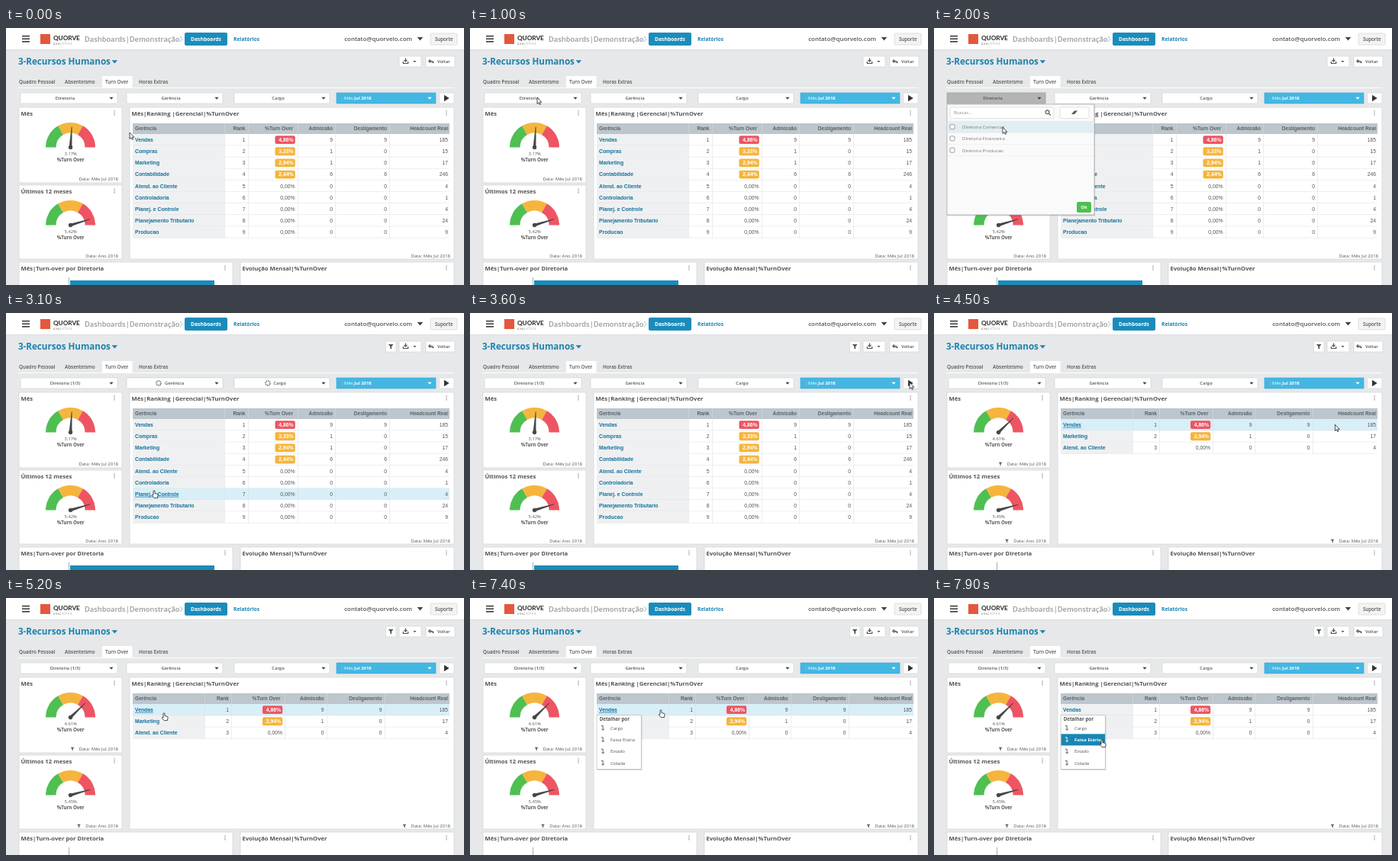
Write an HTML page that moves like this. It is 600 px wide and 337 px high and loops after 8 s.

```html
<!DOCTYPE html>
<html lang="pt-BR">
<head>
<meta charset="utf-8">
<title>Painel de Recursos Humanos</title>
<style>
  html, body { margin: 0; width: 100%; height: 100%; overflow: hidden; background: #e7e8e9; }
  svg { display: block; width: 100%; height: 100%; }
  text { font-family: "Open Sans", sans-serif; font-size: 6px; fill: #555; white-space: pre; }
  .b { font-weight: 700; }
  .s { font-weight: 600; }
  .end { text-anchor: end; }
  .mid { text-anchor: middle; }
  .title { font-size: 7.7px; font-weight: 700; fill: #555; }
  .cell { font-family: "Liberation Sans", Arial, sans-serif; font-size: 6.8px; }
  .head { font-family: "Liberation Sans", Arial, sans-serif; font-size: 6.6px; font-weight: 700; fill: #5a6268; }
  .name { font-weight: 700; fill: #14719c; }
  .white { fill: #fff; }
  .blue { fill: #1a83b0; }
  .hover { fill: #d8eff8; opacity: 0; }
  .on > .hover { opacity: 1; }
  .on > .name { text-decoration: underline; }
  .item.on > .hover { fill: #1b86b2; }
  .item.on > text { fill: #fff; font-weight: 700; }
  .item.on > path { stroke: #fff; }
  .option.on > .hover { fill: #e1eef3; }
</style>
</head>
<body>
<svg id="stage" viewBox="0 0 600 337" xmlns="http://www.w3.org/2000/svg"></svg>
<script>
const LOOP = 8000;
const OPEN = 1100, CHECK = 2250, APPLY = 2600, READY = 3500, RUN = 3700, DONE = 4400, DETAIL = 5900;

const text = (x, y, s, cls = '', style = '') => `<text x="${x}" y="${y}" class="${cls}" style="${style}">${s}</text>`;
const rect = (x, y, w, h, fill, more = '') => `<rect x="${x}" y="${y}" width="${w}" height="${h}" fill="${fill}" ${more}/>`;
const path = (d, fill, more = '') => `<path d="${d}" fill="${fill}" ${more}/>`;
const group = (id, body) => `<g id="${id}">${body}</g>`;
const caret = (x, y, w, fill) => path(`M${x - w} ${y - w / 2}h${2 * w}l${-w} ${w * 1.15}z`, fill);
const funnel = (x, y, k = 1) => path('M-3.3 -3H3.3L.9 0V3.6L-.9 2.4V0Z', '#555', `transform="translate(${x} ${y}) scale(${k})"`);
const box = (x, y, w, h, fill = '#fff') => rect(x, y, w, h, fill, 'rx="1.5" stroke="#d2d4d6" stroke-width=".7"');
const dots = (x, y) => [0, 2.4, 4.8].map(d => `<circle cx="${x}" cy="${y + d}" r=".7" fill="#777"/>`).join('');

const panels = [
  [17, 104, 135, 99, 'Mês'],
  [17, 206, 135, 97, 'Últimos 12 meses'],
  [162, 104, 425, 199, 'Mês|Ranking |Gerencial|%TurnOver'],
  [17, 307, 280, 40, 'Mês|Turn-over por DIretoria'],
  [307, 307, 280, 40, 'Evolução Mensal|%TurnOver']
];
const panel = ([x, y, w, h, s]) =>
  rect(x, y, w, h, '#fff', 'stroke="#d5d7d9" stroke-width=".8"') +
  text(x + 2.4, y + 10.7, s, 'title') + dots(x + w - 10, y + 5);

function header() {
  return rect(0, 0, 600, 28.5, '#fff') + rect(0, 28, 600, .8, '#d9dadb') +
    [10.6, 14.2, 17.8].map(y => rect(21, y - .8, 10, 1.7, '#444')).join('') +
    rect(45, 8, 13, 13, '#e4573d') +
    text(62, 16.4, 'QUORVE', '', 'font:700 8.2px Lato,sans-serif;fill:#222') +
    text(62, 21.6, 'ANALYTICS', '', 'font-size:3.3px;letter-spacing:.9px;fill:#777') +
    text(103, 17.6, 'Dashboards|Demonstração', 's', 'font-size:9.3px;fill:#999') +
    path('M228 11l3 3.5l-3 3.5', 'none', 'stroke="#8cc5dd" stroke-width="1"') +
    rect(234, 6, 56, 17, '#1b8cba', 'rx="2"') +
    text(262, 16.8, 'Dashboards', 'b white mid', 'font-size:6.75px') +
    text(298, 16.8, 'Relatórios', 'b blue', 'font-size:6.7px') +
    text(532, 17.3, 'contato@quorvelo.com', 's end', 'font-size:7.9px') +
    caret(542.5, 14, 3.8, '#444') + box(556, 7, 35, 15, '#f3f3f3') +
    text(573.7, 16.8, 'Suporte', 's mid', 'font-size:6.2px');
}

function toolbar() {
  return text(16, 48.2, '3-Recursos Humanos', 'b blue', 'font-size:11.6px') + caret(142.3, 44, 3.7, '#1a83b0') +
    box(515, 37, 29, 14) + box(550, 37, 38, 14) +
    path('M523.5 39.5v4.3m-2-1.8l2 2l2-2M520.3 44v2.5h6.4v-2.5', 'none', 'stroke="#555" stroke-width="1.2"') +
    caret(535.5, 44, 2, '#555') +
    path('M559.5 46.5C560 43.5 558 42.5 555 42.7V40.5L551.8 43.5L555 46.3V44.3', '#666', 'transform="translate(1 0)"') +
    text(565, 46.2, 'Voltar', 's', 'font-size:5.8px') +
    rect(16, 78, 571, .9, '#fff') + rect(126, 63, 39.5, 15.5, '#fff') +
    [[17, 'Quadro Pessoal'], [77, 'Absenteísmo'], [130, 'Turn Over'], [174, 'Horas Extras']]
      .map(([x, s]) => text(x, 73.4, s, 's', 'font-size:6.3px')).join('');
}

const filter = (x, w, s, id) => box(x, 85, w, 14) +
  text(x + w / 2 - 5, 94.2, s, 's mid', 'font-size:5.9px') + caret(x + w - 8, 92, 2.6, '#444');

function filters() {
  const wait = (cx) => `<circle class="spin" data-c="${cx} 92" cx="${cx}" cy="92" r="3" fill="none" stroke="#555" stroke-width="1.6" stroke-dasharray="1.25 1.106"/>`;
  const waiting = (x, w, s, c, tx) => box(x, 85, w, 14) + wait(c) +
    text(tx, 94.2, s, 's mid', 'font-size:5.9px') + caret(x + w - 8, 92, 2.6, '#444');
  return group('all', filter(19, 127, 'Diretoria')) + group('some', filter(19, 127, 'Diretoria (1/3)')) +
    filter(158, 126, 'Gerência') + filter(299, 125, 'Cargo') +
    group('waits', waiting(158, 126, 'Gerência', 200, 220.5) + waiting(299, 125, 'Cargo', 343, 358.5)) +
    rect(433, 85, 130, 14, '#43b7e2', 'stroke="#38a5cf" stroke-width=".6"') +
    text(440, 94.3, ': Mês <tspan class="b">Jul 2018</tspan>', 'white', 'font-size:5.9px') + caret(555, 92, 2.6, '#fff') +
    box(567.5, 85, 19.5, 14) + path('M574 87.8v8.4l6.6 -4.2z', '#333') +
    group('funnel', box(497.5, 37, 13.5, 14) + funnel(504.2, 44));
}

function gauge(cy, value, angle) {
  const point = (r, deg) => {
    const a = deg * Math.PI / 180;
    return `${84.5 - r * Math.cos(a)} ${cy - r * Math.sin(a)}`;
  };
  const arcs = ['#4fbf52', '#f5b53d', '#ee5562'].map((c, i) => path(
    `M${point(32.5, i * 60)}A32.5 32.5 0 0 1 ${point(32.5, i * 60 + 60)}L${point(19, i * 60 + 60)}A19 19 0 0 0 ${point(19, i * 60)}Z`, c));
  return arcs.join('') +
    `<g transform="translate(84.5 ${cy}) rotate(${angle})">${path('M-1.9 0L-.4 -27H.4L1.9 0Z', '#474747')}<circle r="2.7" fill="#474747"/></g>` +
    text(84.7, cy + 10.6, value, 'mid', 'font-size:5.8px') +
    text(84.7, cy + 18, '%Turn Over', 'b mid', 'font-size:6.1px');
}

const data = [
  ['Vendas', '4,86%', 9, 9, 185, '#ee5562'],
  ['Compras', '3,33%', 1, 0, 15, '#f5b53d'],
  ['Marketing', '2,94%', 1, 0, 17, '#f5b53d'],
  ['Contabilidade', '2,44%', 6, 6, 246, '#f5b53d'],
  ['Atend. ao Cliente', '0,00%', 0, 0, 4],
  ['Controladoria', '0,00%', 0, 0, 1],
  ['Planej. e Controle', '0,00%', 0, 0, 4],
  ['Planejamento Tributario', '0,00%', 0, 0, 24],
  ['Producao', '0,00%', 0, 0, 9]
];
const TOP = 139, STEP = 15.15;

function table(rows, split, edges) {
  const heads = ['Rank', '%Turn Over', 'Admissão', 'Desligamento', 'Headcount Real'];
  let out = rect(166, 125, 415, 14, '#bcc6cc') + text(169, 134.3, 'Gerência', 'head') +
    heads.map((s, i) => text(edges[i] - (i == 1 ? 2.5 : 0), 134.3, s, 'head end')).join('');
  rows.forEach(([name, rate, hired, left, total, badge], i) => {
    const y = TOP + i * STEP, base = y + 9.9;
    const values = [i + 1, rate, hired, left, total];
    out += `<g class="row">` + rect(166, y, split - 166, STEP, '#eff0f1') +
      `<rect class="hover" x="166" y="${y}" width="415" height="${STEP}"/>` +
      rect(166, y + STEP - .5, 415, .5, '#dcdee0') +
      text(169, base, name, 'cell name') +
      (badge ? rect(edges[1] - 26, y + 2.2, 26.3, 10.8, badge, 'rx="2"') : '') +
      values.map((v, k) => text(edges[k] - (k == 1 && badge ? 2 : 0), base, v, 'cell end' + (k == 1 && badge ? ' b white' : ''))).join('') + '</g>';
  });
  const end = rows.length * STEP;
  return out + [split, ...edges.slice(0, 4).map(x => x + 3.5)].map(x => rect(x, 125, .5, 14 + end, '#d9dcde')).join('');
}

const notes = (icon) => [[147, 200, 'Mês Jul 2018', 87], [147, 301, 'Ano 2018', 95.5], [582, 301, 'Mês Jul 2018', 522]]
  .map(([x, y, s, fx]) => text(x, y, 'Data: ' + s, 'end') + (icon ? funnel(fx, y - 2.2, .7) : '')).join('');

function reports() {
  const axis = rect(82, 327, .8, 10, '#999');
  return panels.map(panel).join('') +
    group('before', gauge(156.5, '3.17%', 3.5) + gauge(258.5, '5.42%', 73) + notes(false) +
      table(data, 286, [313.5, 378.5, 428, 499, 579]) + axis + rect(84, 331, 189, 6, '#1b8cba')) +
    group('after', gauge(156.5, '4.61%', 46) + gauge(258.5, '5.45%', 74) + notes(true) +
      table([data[0], data[2], data[4]], 260, [292, 362, 416.5, 492.5, 579]) + axis);
}

function loading() {
  const busy = (cx, y) => rect(cx - 36.5, y, 73, 30, '#b9bfc3', 'opacity=".93"') +
    `<g class="spin" data-c="${cx} ${y + 9}">` +
    path(`M${cx - 2.4} ${y + 7.8}A2.7 2.7 0 1 1 ${cx - .6} ${y + 11.6}`, 'none', 'stroke="#555" stroke-width="1.2"') + '</g>' +
    text(cx, y + 23.2, 'Executando relatório', 'mid', 'font-size:6.4px;fill:#666');
  return group('loading', panels.map(([x, y, w, h]) => rect(x, y, w, h, '#d7d9db', 'opacity=".62"')).join('') +
    busy(84.5, 138) + busy(84.5, 239.5) + busy(374.5, 188));
}

function picker() {
  const options = ['Comercial', 'Financeira', 'Producao'].map((s, i) => {
    const y = 122 + i * 15.3;
    return `<g class="option"><rect class="hover" x="17.4" y="${y}" width="192.2" height="15.3"/>` +
      rect(17.4, y + 15, 192.2, .4, '#e2e4e5') +
      rect(21, y + 4.6, 6, 6, '#fff', 'rx="1" stroke="#888" stroke-width=".8"') +
      text(37, y + 10, 'Diretoria ' + s, '', 'font-size:6.1px;fill:#777') + '</g>';
  }).join('');
  return group('picker',
    rect(17, 85, 129, 14, '#b2b4b5', 'stroke="#999" stroke-width=".6"') +
    text(77, 94.2, 'Diretoria', 's mid', 'font-size:5.9px') + caret(138, 92, 2.6, '#444') +
    rect(17, 101, 194, 145.5, '#000', 'opacity=".15"') +
    rect(17, 100, 193, 145, '#fafafa', 'stroke="#a9abad" stroke-width=".8"') +
    box(21, 104, 136, 14.5) + text(26, 113.3, 'Buscar...', '', 'fill:#888') +
    `<circle cx="148.5" cy="110.3" r="2.4" fill="none" stroke="#555" stroke-width="1.1"/>` +
    path('M150.3 112.1l2.5 2.5', 'none', 'stroke="#555" stroke-width="1.3"') +
    box(165, 104, 38, 14.5) + path('M180 113l4-4.5h4l-4 4.5z', '#555') + options +
    group('tick', path('M22 129.8l1.6 1.7l3-3.6', 'none', 'stroke="#333" stroke-width="1.1"')) +
    rect(187, 228, 19, 14, '#4fbf52', 'rx="2"') + text(196.5, 237.3, 'Ok', 'b white mid'));
}

function details() {
  const items = ['Cargo', 'Faixa Etária', 'Estado', 'Cidade'].map((s, i) => {
    const y = 163 + i * 15.3;
    return `<g class="item"><rect class="hover" x="166.5" y="${y}" width="57.5" height="15.1"/>` +
      path(`M171.8 ${y + 4.6}h2.4v5.6m-1.7-1.6l1.7 1.8l1.7-1.8`, 'none', 'stroke="#555" stroke-width=".9"') +
      text(184, y + 9.8, s) + '</g>';
  }).join('');
  return group('details', rect(166.5, 154.5, 59, 71.5, '#000', 'opacity=".15"') +
    rect(166, 153.5, 58.3, 71, '#fff', 'stroke="#b5b8ba" stroke-width=".7"') +
    text(169.7, 161, 'Detalhar por', 'b', 'font-size:6.2px') + items);
}

const pointer = group('pointer',
  group('arrow', path('M0 0V8.4L1.9 6.7L3.2 9.5L4.5 8.9L3.2 6.2H5.8Z', '#fff', 'stroke="#222" stroke-width=".8"')) +
  group('hand', path('M-1 .8a1 1 0 0 1 2 0V3.6L4.4 4.4Q5.3 4.8 5.1 6L4.4 9.6H.2L-2.7 6.2Q-2.6 4.8 -1 6Z', '#fff', 'stroke="#222" stroke-width=".8"')));

const stage = document.getElementById('stage');
stage.innerHTML = rect(0, 0, 600, 337, '#e7e8e9') + header() + toolbar() + filters() + reports() + loading() + picker() + details() + pointer;

// time, x, y of the pointer tip
const route = [
  [0, 162, 137], [200, 162, 137], [900, 88, 91], [1250, 88, 91], [1800, 91, 129], [2000, 90, 130], [2250, 90, 130],
  [2500, 197, 234], [3100, 194, 233], [3200, 194, 233], [3600, 576, 91], [3750, 576, 91], [4000, 555, 142],
  [4400, 540, 146], [5200, 207, 151], [5600, 188, 147], [6100, 188, 147], [7000, 250, 147], [7400, 250, 147],
  [7800, 220, 186], [8000, 220, 186]
];

function locate(t) {
  const i = route.findIndex(p => p[0] > t);
  const [t0, x0, y0] = route[i - 1], [t1, x1, y1] = route[i];
  const u = (t - t0) / (t1 - t0), k = u * u * (3 - 2 * u);
  return [x0 + (x1 - x0) * k, y0 + (y1 - y0) * k];
}

const all = (s) => [...stage.querySelectorAll(s)];
const spins = all('.spin'), options = all('.option'), items = all('.item');
const rowsBefore = all('#before .row'), rowsAfter = all('#after .row');
const show = (id, on) => { document.getElementById(id).style.display = on ? '' : 'none'; };
const mark = (list, at) => list.forEach((el, i) => el.classList.toggle('on', i === at));
const within = (v, a, b) => v >= a && v < b;

function draw(t) {
  const [x, y] = locate(t);
  const open = within(t, OPEN, APPLY), busy = within(t, RUN, DONE), done = t >= DONE, detail = t >= DETAIL;
  show('picker', open);
  show('tick', t >= CHECK);
  show('all', t < APPLY);
  show('some', t >= APPLY);
  show('funnel', t >= APPLY);
  show('waits', within(t, APPLY, READY));
  show('loading', busy);
  show('before', !done);
  show('after', done);
  show('details', detail);

  const inDetail = detail && within(x, 166, 224.5) && within(y, 153.5, 224.5);
  const rows = done ? rowsAfter : rowsBefore;
  const row = !open && !busy && !inDetail && within(x, 166, 581) ? Math.floor((y - TOP) / STEP) : -1;
  const item = inDetail ? Math.floor((y - 163) / 15.3) : -1;
  mark(rows, row);
  mark(items, item);
  mark(options, open && within(x, 17, 210) ? Math.floor((y - 122) / 15.3) : -1);

  const link = inDetail || (row >= 0 && row < rows.length && x < (done ? 260 : 286));
  show('hand', link);
  show('arrow', !link);
  document.getElementById('pointer').setAttribute('transform', `translate(${x} ${y})`);
  spins.forEach(el => el.setAttribute('transform', `rotate(${t * .36 % 360} ${el.dataset.c})`));
}

function tick() {
  draw(performance.now() % LOOP);
  requestAnimationFrame(tick);
}
tick();
</script>
</body>
</html>
```
